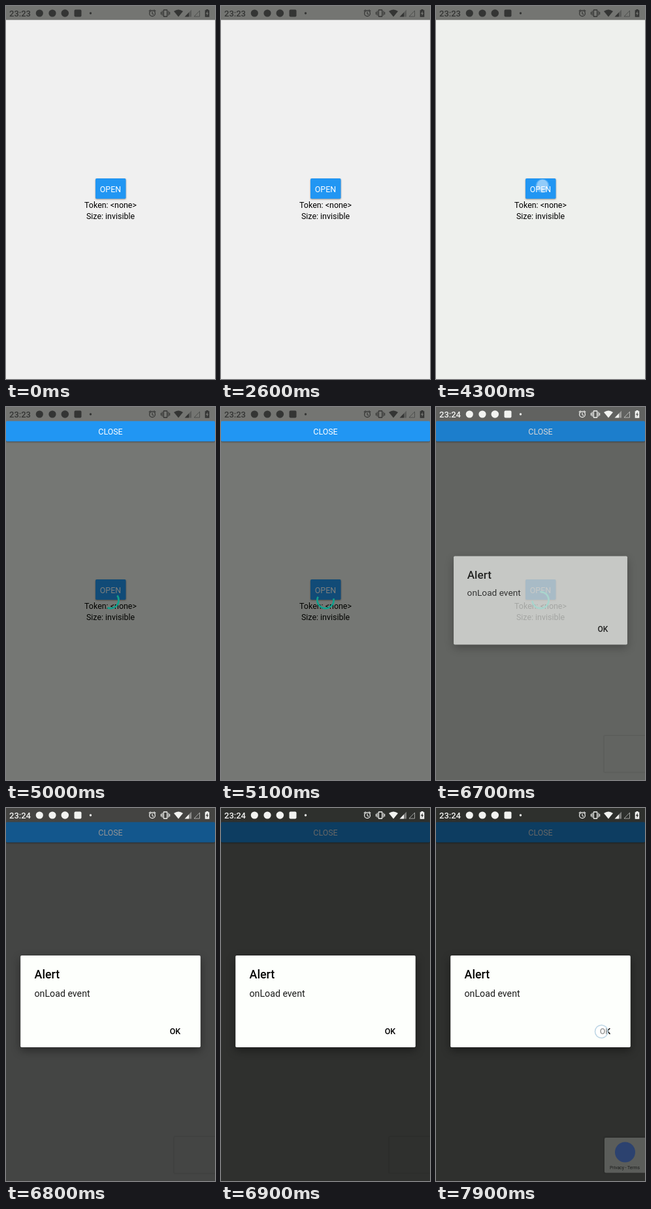
These frames come from a looping animation (320 px wide and 569 px high, 8 s). An HTML page:

```html
<!DOCTYPE html>
<html lang="en">
<head>
<meta charset="utf-8">
<title>Modal demo</title>
<style>
  html, body { margin: 0; width: 100%; height: 100%; overflow: hidden; background: #eef0ed; }
  svg { display: block; width: 100vw; height: 100vh; font: 12.44px Roboto, sans-serif; }
  .mid { text-anchor: middle; }
  .raised { filter: drop-shadow(0 1px 1px rgba(0, 0, 0, .4)); }
  .dialog { filter: drop-shadow(0 5px 7px rgba(0, 0, 0, .4)); }
  .line { fill: none; stroke: currentColor; }
</style>
</head>
<body>
<svg viewBox="0 0 320 569">
  <rect id="page" width="320" height="569"/>
  <rect width="320" height="21.3" fill="#747572"/>
  <g class="mid">
    <text x="160" y="307.5">Token: &lt;none&gt;</text>
    <text x="160" y="324.5">Size: invisible</text>
    <rect class="raised" x="137" y="263" width="46.5" height="31" rx="1.8" fill="#2196f3"/>
    <text x="160" y="283.5" fill="#fff">OPEN</text>
  </g>
  <g id="tap">
    <circle cx="163" cy="274.5" r="10.5" fill="#fff" fill-opacity=".25"/>
    <circle cx="163" cy="273.5" r="8.5" fill="#fff" fill-opacity=".35"/>
  </g>

  <g id="modal">
    <rect y="21.3" width="320" height="547.7" fill="#030500" fill-opacity=".51"/>
    <rect class="raised" y="21.5" width="320" height="31" rx="1.8" fill="#2196f3"/>
    <text class="mid" x="160" y="42" fill="#fff">CLOSE</text>
    <path id="spinner" fill="none" stroke="#12a08d" stroke-width="2.7"/>
  </g>

  <rect id="dim" width="320" height="569" fill="#000200"/>

  <rect id="frame" x="257" y="501" width="68" height="56.5" rx="2" fill="none" stroke="#000" stroke-width="2" stroke-opacity=".06"/>
  <g id="badge">
    <rect x="258" y="503" width="66" height="53.5" rx="2" fill="#5b5d5a"/>
    <circle cx="289.5" cy="525" r="15.5" fill="#2c426f"/>
    <text class="mid" x="289" y="551" font-size="6.8" fill="#1c1d1c">Privacy - Terms</text>
  </g>

  <g id="status">
    <text id="clock" x="5" y="15.6" font-size="13" font-weight="500" fill="currentColor"></text>
    <g fill="currentColor">
      <circle cx="51.3" cy="11" r="5.6"/>
      <circle cx="71" cy="11" r="5.6"/>
      <circle cx="90.3" cy="11" r="5.8"/>
      <rect x="104.5" y="5.5" width="11" height="11" rx="2"/>
      <circle cx="129.5" cy="11" r="1.7"/>
      <path d="M257 8Q264 3 271 8L264 16.5Z"/>
      <path d="M273.5 16.5L280 9.8V16.5Z"/>
      <path d="M280 9.8L284 5.8V16.5H280Z" opacity=".4"/>
      <path fill-rule="evenodd" d="M306.5 6.2V5H309.5V6.2H311.3V16.7H304.7V6.2ZM308.6 7.5L306 12H307.6V15.3L310 10.8H308.6Z"/>
    </g>
    <g class="line">
      <circle cx="224" cy="11.3" r="4.4" stroke-width="1.2"/>
      <path d="M224 8.5V11.6L226.2 13M218.8 8L221.6 5.6M229.2 8L226.4 5.6" stroke-width="1.1"/>
      <rect x="241.3" y="6" width="5.4" height="10" rx=".6" stroke-width="1.3"/>
      <path d="M239.2 7.5V14.5M248.8 7.5V14.5M237.4 9V13M250.6 9V13" stroke-width="1.1"/>
      <path d="M288 16L296.5 7.2V16Z" stroke-width=".9" opacity=".65"/>
    </g>
  </g>

  <g id="alert">
    <rect class="dialog" x="22.2" y="225" width="275.6" height="140" rx="1.8" fill="#fdfffc"/>
    <text x="43.6" y="260.3" font-size="17.8" font-weight="500">Alert</text>
    <text x="43.5" y="287.6" font-size="14.2" fill="#1b1b1b">onLoad event</text>
    <text x="250.7" y="345" font-weight="500">OK</text>
    <circle id="press" cx="253.3" cy="341" r="9.8" fill="#fff" fill-opacity=".6" stroke="#bcd5e4" stroke-width="1.5"/>
  </g>
</svg>
<script>
const LOOP = 8000, SPIN_START = 4757, SPIN_CYCLE = 1333;
const $ = id => document.getElementById(id);
const ramp = (t, from, to) => Math.min(1, Math.max(0, (t - from) / (to - from)));
const easeOut = k => 1 - (1 - k) ** 2;
const set = (id, name, value) => $(id).setAttribute(name, value);
const fade = (id, value) => set(id, 'opacity', +value);

// Fast-in curve (0,0) (.2,0) (.1,1) (.5,1), solved for x by bisection
function trim(x) {
  if (x <= 0) return 0;
  if (x >= .5) return 1;
  let lo = 0, hi = 1, u;
  for (let i = 0; i < 20; i++) {
    u = (lo + hi) / 2;
    const v = 1 - u;
    if (.6 * v * v * u + .3 * v * u * u + .5 * u ** 3 < x) lo = u; else hi = u;
  }
  return 3 * (1 - u) * u * u + u ** 3;
}

function arc(t) {
  const age = Math.max(0, t - SPIN_START), x = age % SPIN_CYCLE / SPIN_CYCLE;
  const turn = age / 2222 + .25 * x - .25;
  const point = part => {
    const a = 2 * Math.PI * (turn + part);
    return `${160 + 12.6 * Math.cos(a)} ${294.6 + 12.6 * Math.sin(a)}`;
  };
  const start = .75 * trim(x - .5), end = Math.max(.75 * trim(x), start + .01);
  return `M${point(start)}A12.6 12.6 0 ${+(end - start > .5)} 1 ${point(end)}`;
}

function draw(t) {
  const shown = easeOut(ramp(t, 6640, 6790)), late = t >= 6690;
  const tint = ramp(t, 3200, 3600);

  set('page', 'fill', `rgb(${240 - 2 * tint}, 240, ${240 - 3 * tint})`);
  fade('tap', t < 4290 ? 0 : 1 - ramp(t, 4500, 4600));
  fade('modal', ramp(t, SPIN_START, SPIN_START + 200));
  // The spinner stalls briefly while the page loads
  set('spinner', 'd', arc(t > 6200 && t < 6490 ? 6200 : t));

  fade('dim', .6 * ramp(t, 6640, 6870));
  fade('frame', t >= 6490);
  fade('badge', t >= 6990);
  fade('alert', shown);
  set('alert', 'transform', `translate(160 295) scale(${.9 + .1 * shown}) translate(-160 -295)`);
  fade('press', t >= 7850);
  $('clock').textContent = late ? '23:24' : '23:23';
  set('status', 'color', late ? '#f2f3f1' : '#343534');
}

function tick() {
  draw(performance.now() % LOOP);
  requestAnimationFrame(tick);
}
tick();
</script>
</body>
</html>
```
